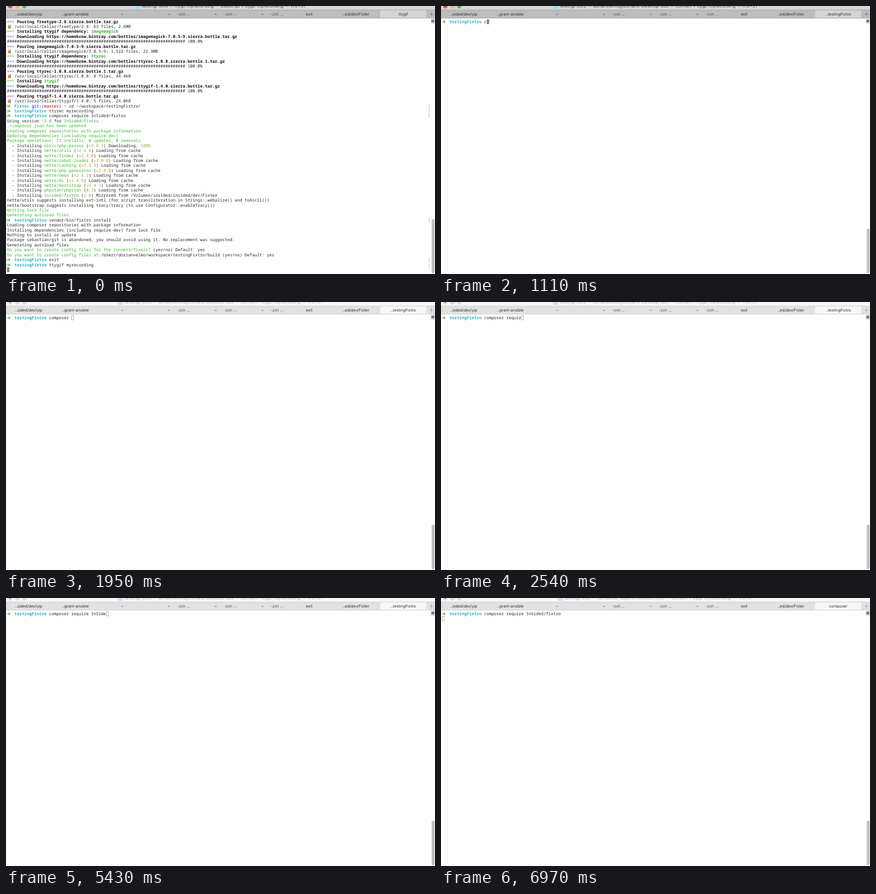
Recreate the animation shown at these times as an HTML page. Size 900 by 562 pixels, loop 8000 ms.

```html
<!DOCTYPE html>
<html lang="en">
<head>
<meta charset="utf-8">
<title>Terminal session</title>
<style>
html, body { margin: 0; width: 100%; height: 100%; overflow: hidden; background: #fefefe; }
body { position: relative; text-rendering: geometricPrecision; font-family: Inter, "Open Sans", sans-serif; }
body > * { position: absolute; }

#bar { left: 0; top: 0; width: 900px; height: 8px; overflow: hidden; background: linear-gradient(#dadada, #d2d2d2); }
#bar b { position: absolute; top: -4.5px; width: 9.5px; height: 9.5px; border-radius: 50%; }
#bar b:first-child::after { content: ""; position: absolute; left: 3.2px; top: 3.2px; width: 3px; height: 3px; border-radius: 50%; background: #7a1c18; }
#title { position: absolute; left: 0; top: -6px; width: 898px; display: flex; justify-content: center; gap: 3px; white-space: pre; font-size: 9.35px; line-height: 13px; color: #484848; }
#title::before { content: ""; width: 11px; height: 9px; margin-top: 3px; border-radius: 1px; background: #a5d8f0; }

#tabs { left: 0; top: 8px; width: 900px; height: 16px; border: solid #a2a2a2; border-width: 1px 0; background: #bdbdbd; font-size: 8.2px; line-height: 16px; color: #333; }
#tabs span { position: absolute; top: 0; transform: translateX(-50%); white-space: pre; }
#tabs .job { color: #555; }
#live { position: absolute; left: 785px; width: 97px; height: 16px; border-right: 1px solid #adadad; background: #d4d4d4; text-align: center; }
#plus { position: absolute; left: 888px; top: 4px; width: 9px; height: 9px; background: linear-gradient(#777, #777) 4px 0 / 1px 9px no-repeat, linear-gradient(#777, #777) 0 4px / 9px 1px no-repeat; }

.idle #bar { background: #f6f6f6; }
.idle #bar b { background: #dcdcdc !important; }
.idle #bar b:first-child::after { background: #777; }
.idle #title { color: #b2b2b2; }
.idle #title::before { background: #c3e5f5; }
.idle #tabs { background: #e2e2e2; border-color: #d0d0d0; }
.idle #live { background: #f6f6f6; border-color: #d4d4d4; }
.idle #plus { opacity: .6; }

#term { left: 2px; top: 27.6px; white-space: pre; font: 8.667px/10.4px "Noto Sans Mono", "Liberation Mono", monospace; color: #262626; }
#term .g { color: #35b62c; }
#term .y { color: #b59a45; }
#term .b { color: #5450e8; }
#term .k { font-weight: bold; color: #111; }
#term .h { font-weight: bold; color: #35b62c; }
#term .c { font-weight: bold; color: #28b4c4; }
#term .n { font-weight: bold; color: #4a62d8; }
#term .r { font-weight: bold; color: #d8483c; }
#term .a { display: inline-block; width: 5.2px; height: 10.4px; vertical-align: top; font-weight: bold; color: #2fb41d; }
#term .mug { display: inline-block; width: 5px; height: 7px; margin: 1px 2.7px 0 1.7px; vertical-align: top; border: solid #a06a35; border-width: 0 1px 1px 0; border-radius: 1px; background: linear-gradient(#eee2cc 25%, #d19a4c 25%); }
#term .mark { position: absolute; left: -2.5px; width: 891px; display: flex; justify-content: space-between; font-style: normal; color: #a5a5a5; }
.mark::before { content: "["; }
.mark::after { content: "]"; }
#cursor { display: inline-block; box-sizing: border-box; width: 5.2px; height: 10px; vertical-align: top; background: #8c8c8c; border: 1px solid #7c7c7c; }
.idle #cursor { background: none; border-color: #a8a8a8; }

#pane { left: 891px; top: 27px; width: 9px; height: 10px; background: #d6d6d6; }
#pane::after { content: ""; position: absolute; left: 2px; top: 2px; width: 5px; height: 5px; box-sizing: border-box; border: 1px solid #444; background: linear-gradient(#444, #444) 0 1px / 5px 1px no-repeat; }
#thumb { left: 893px; width: 6px; border-radius: 3px; background: #c0c0c0; }
</style>
</head>
<body>
<div id="bar">
  <b style="left:4.2px;background:#f9564f"></b><b style="left:19.2px;background:#fbbd3f"></b><b style="left:33.8px;background:#36c84b"></b>
  <div id="title"></div>
</div>
<div id="tabs"><div id="live"></div><div id="plus"></div></div>
<div id="term"></div>
<div id="pane"></div>
<div id="thumb"></div>
<script>
const $ = id => document.getElementById(id);

const labels = ["..sided/dev/yip", "..grant-ansible", "~", "~", "~", "~", "exit", "..ed/dev/Fixter"];
const addLabel = (text, x, cls = "") =>
  $("tabs").insertAdjacentHTML("beforeend", `<span class="${cls}" style="left:${x}px">${text}</span>`);
labels.forEach((text, i) => addLabel(text, 47.5 + 98.1 * i));
[372.5, 470.5, 568.5].forEach(x => addLabel("-zsh ...", x, "job"));

// {x text} becomes a span of class x
const paint = s => s.replace(/\{(\w) ([^}]*)\}/g, '<span class="$1">$2</span>');
const prompt = cmd => `{a ➜}  {c testingFixtro} ${cmd}`;
const mark = line => '<i class="mark"></i>' + line;

const pour = (file, cellar) => [
  `{b ==>} {k Pouring ${file}.tar.gz}`,
  `<i class="mug"></i> /usr/local/Cellar/${cellar}`
];
const fetchBottle = (what, name, file) => [
  `{g ==>} {k Installing${what}} {h ${name}}`,
  `{b ==>} {k Downloading https://homebrew.bintray.com/bottles/${file}.tar.gz}`,
  "#".repeat(72) + " 100.0%"
];
const install = (name, version, note = "Loading from cache") =>
  `  - Installing {g ${name}} ({y ${version}}) ${note}`;

const history = [
  ...pour("freetype-2.8.sierra.bottle", "freetype/2.8: 63 files, 2.6MB"),
  ...fetchBottle(" ttygif dependency:", "imagemagick", "imagemagick-7.0.5-9.sierra.bottle"),
  ...pour("imagemagick-7.0.5-9.sierra.bottle", "imagemagick/7.0.5-9: 1,522 files, 22.3MB"),
  ...fetchBottle(" ttygif dependency:", "ttyrec", "ttyrec-1.0.8.sierra.bottle.1"),
  ...pour("ttyrec-1.0.8.sierra.bottle.1", "ttyrec/1.0.8: 8 files, 44.4KB"),
  ...fetchBottle("", "ttygif", "ttygif-1.4.0.sierra.bottle"),
  ...pour("ttygif-1.4.0.sierra.bottle", "ttygif/1.4.0: 5 files, 24.0KB"),
  mark("{a ➜}  {c Fixter} {n git:(}{r master}{n )} {y ×} cd ~/workspace/testingFixtro/"),
  mark(prompt("ttyrec myrecording")),
  mark(prompt("composer require InSided/fixtro")),
  "Using version {g ^2.0} for {g InSided/fixtro}",
  "{g ./composer.json has been updated}",
  "{g Loading composer repositories with package information}",
  "{g Updating dependencies (including require-dev)}",
  "{g Package operations: 11 installs, 0 updates, 0 removals}",
  install("nikic/php-parser", "v3.0.5", "Downloading: {y 100%}"),
  install("nette/utils", "v2.4.6"),
  install("nette/finder", "v2.4.0"),
  install("nette/robot-loader", "v3.0.0"),
  install("nette/caching", "v2.5.3"),
  install("nette/php-generator", "v3.0.0"),
  install("nette/neon", "v2.4.1"),
  install("nette/di", "v2.4.8"),
  install("nette/bootstrap", "v2.4.3"),
  install("phpstan/phpstan", "0.7"),
  install("insided/fixtro", "2.0", "Mirrored from /Volumes/insided/insided/dev/Fixter"),
  "nette/utils suggests installing ext-intl (for script transliteration in Strings::webalize() and toAscii())",
  "nette/bootstrap suggests installing tracy/tracy (to use Configurator::enableTracy())",
  "{g Writing lock file}",
  "{g Generating autoload files}",
  mark(prompt("vendor/bin/fixtro install")),
  "Loading composer repositories with package information",
  "Installing dependencies (including require-dev) from lock file",
  "Nothing to install or update",
  "Package sebastian/git is abandoned, you should avoid using it. No replacement was suggested.",
  "Generating autoload files",
  "{g Do you want to create config files for the runners/fixers?} (yes/no) Default: yes",
  "{g Do you want to create config files at:}/Users/dorianvelmo/workspace/testingFixtro/build (yes/no) Default: yes",
  mark(prompt("exit")),
  mark(prompt("ttygif myrecording")),
  ""
].join("\n");

// "<" is a backspace
const keys = "composer require Insi<<Sided/fixtro";
const keyTimes = [
  1110, 1200, 1380, 1450, 1510, 1690, 1770, 1850, 1950, 2010, 2230, 2290, 2340, 2490, 2540, 3220, 3490, 3620,
  3780, 3920, 4260, 4330, 4760, 5010, 5170, 5300, 5430, 5730, 6040, 6230, 6300, 6550, 6610, 6680, 6870
];
const LOOP = 8000, CLEAR = 80, PROMPT = 200, BLUR = 1950, ENTER = 6970;

const typed = t => [...keys].reduce(
  (s, key, i) => t < keyTimes[i] ? s : key === "<" ? s.slice(0, -1) : s + key, "");

function screen(t) {
  if (t < CLEAR) return history;
  if (t < PROMPT) return "";
  return prompt(typed(t)) + (t < ENTER ? "" : "\n");
}

let shown;
function draw(now) {
  const t = now % LOOP;
  const stage = [CLEAR, PROMPT, BLUR, ENTER].filter(x => t >= x).length;
  const text = screen(t);
  const state = stage + text;
  if (state !== shown) {
    shown = state;
    const [job, proc, tab] =
      t < CLEAR ? ["ttygif myrecording", "osascript", "ttygif"] :
      t < ENTER ? ["dorianvelmo@Dorians-Desktop-Box", "convert", "..testingFixtro"] :
      ["composer require InSided/fixtro", "convert", "composer"];
    document.body.className = t < BLUR ? "" : "idle";
    $("title").textContent = `testingFixtro — ${job} — ${proc} • ttygif myrecording — 170×51`;
    $("live").textContent = tab;
    $("term").innerHTML = paint(text) + '<i id="cursor"></i>';
    const top = t < CLEAR ? 447 : 467;
    $("thumb").style.top = top + "px";
    $("thumb").style.height = 560 - top + "px";
  }
  requestAnimationFrame(draw);
}
draw(performance.now());
</script>
</body>
</html>
```
